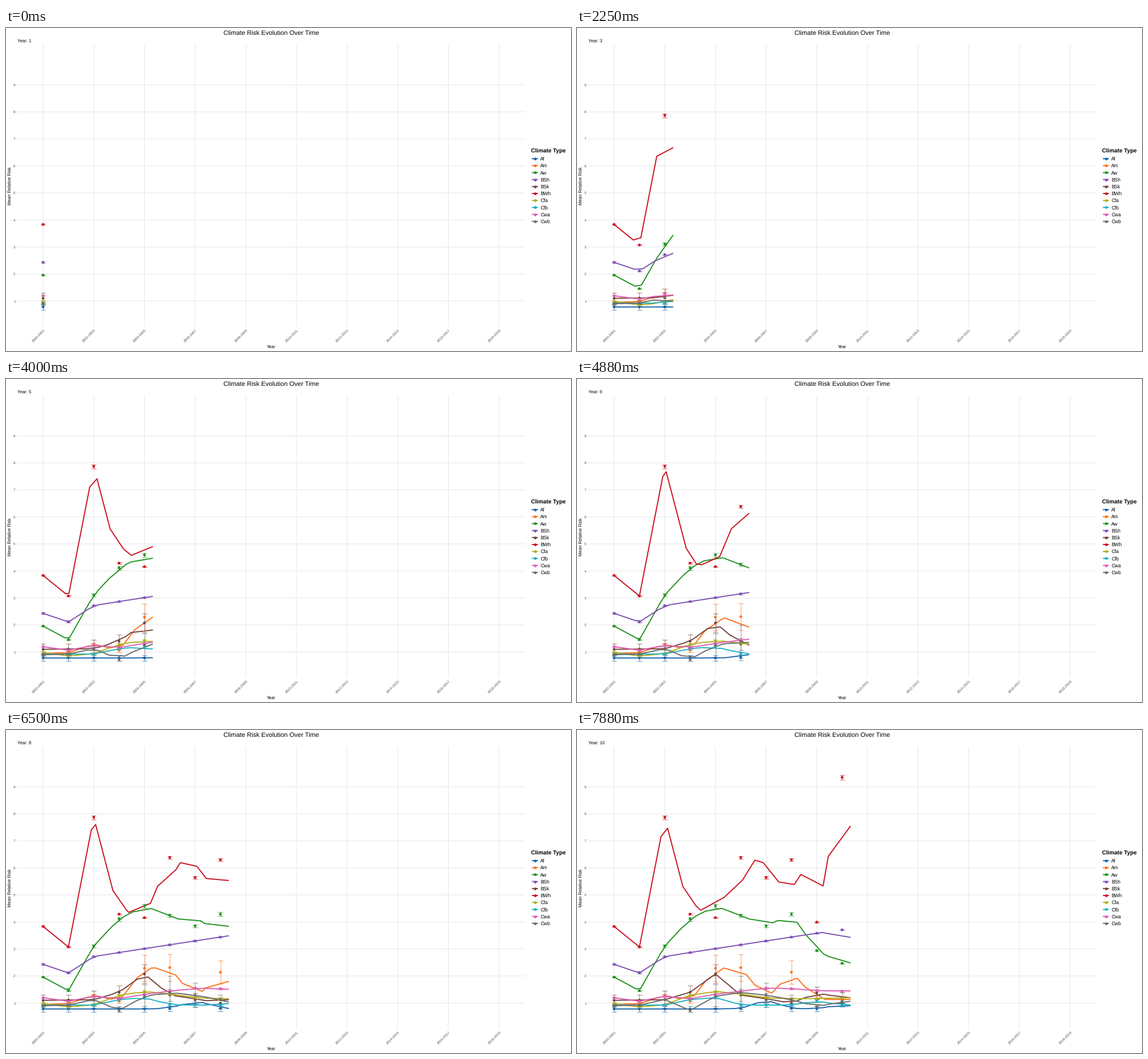
A matplotlib script that plays this animation: 990x566 px, repeating every 8 s.

```python
import matplotlib.pyplot as plt
import numpy as np
from matplotlib.animation import FuncAnimation
from matplotlib.collections import LineCollection
from matplotlib.colors import to_rgba

W, H, DPI = 990, 566, 64
PT = 72 / DPI  # points per pixel
FRAMES, INTERVAL = 64, 125
PATH_POINTS = 50

# First frame and number of steps of the move to each next year
STARTS = np.cumsum([4] + [7] * 6 + [6, 6, 5])
STEPS = [3, 2] + [3] * 8


class Climate:
    """A straight trend with bell-shaped bumps (year, height, width)."""

    def __init__(self, color, start, slope, bumps, error=.03, error_growth=0):
        years = np.arange(1, len(STARTS) + 2)
        swing = sum(height * np.exp(-((years - centre) / width) ** 2)
                    for centre, height, width in bumps)
        self.color = color
        self.risk = start + slope * (years - 1) + swing
        self.error = error + error_growth * np.maximum(swing, 0)


CLIMATES = {
    "Af": Climate("#1764ab", .78, 0, [(7, .33, .6), (10, .18, .5)], .1),
    "Am": Climate("#fd6f1c", .95, .02, [(3, .3, .5), (5.5, 1.86, .8), (8, 1.05, .5)],
                  .07, .34),
    "Aw": Climate("#20921f", 1.9, .06, [(2, -.95, .6), (5, 2.45, 2.3), (8, 1.52, .9)],
                  .02, .025),
    "BSh": Climate("#7f4fb3", 2.44, .143, [(2, -.47, .5), (11, -1, .5)], .025),
    "BSk": Climate("#73423a", 1.1, .01, [(4.9, .95, .8), (8, -.18, .5), (9, .2, .5)],
                   .2, .15),
    "BWh": Climate("#cb1020", 3.85, 0,
                   [(2, -.92, .5), (3.1, 4.15, .6), (6.35, 2.95, .9),
                    (8, 2.35, .5), (10, 5.5, .5)], .02, .013),
    "Cfa": Climate("#b0b016", .99, .022, [(2.5, -.25, .8), (5, .35, 1.6)]),
    "Cfb": Climate("#1cb2c5", .92, 0, [(4.6, .36, .8), (9, .15, .6)], .05),
    "Cwa": Climate("#dd5cb4", 1.2, .026, [(2, -.16, .5), (4, -.12, .5), (7.2, .2, 1.5)]),
    "Cwb": Climate("#696969", .9, .018,
                   [(3, .18, .5), (4, -.33, .5), (6, .4, 1.7), (9, -.2, .5)], .05, 1.4),
}


def px(year):
    return 65 + 44.39 * (np.asarray(year) - 1)


def py(value):
    return 478.4 - 47.35 * (np.asarray(value) - 1)


def dense_path(values):
    """Split the segments, by their length, until the path has PATH_POINTS."""
    years = np.arange(1, len(values) + 1)
    lengths = np.hypot(1, np.diff(values))
    rest, spare, xs = lengths.sum(), PATH_POINTS - len(values), []
    for year, length in zip(years, lengths):
        extra = round(spare * length / rest)
        xs.extend(np.linspace(year, year + 1, extra + 2)[:-1])
        rest, spare = rest - length, spare - extra
    xs.extend([years[-1]] * (PATH_POINTS - len(xs)))
    return np.array([xs, np.interp(xs, years, values)])


def morph(values, year, t):
    return (1 - t) * dense_path(values[:year]) + t * dense_path(values[:year + 1])


plt.rcParams["font.family"] = "Liberation Sans"
plt.rcParams["text.hinting"] = "none"
fig = plt.figure(figsize=(W / DPI, H / DPI), dpi=DPI, facecolor="white")
ax = fig.add_axes([0, 0, 1, 1])
ax.set(xlim=(0, W), ylim=(H, 0))
ax.axis("off")


def text(x, y, s, size, **style):
    return ax.text(x, y, s, fontsize=size * PT, **style)


def stroke(xs, ys, color, width, **style):
    return ax.plot(xs, ys, color=color, lw=width * PT, solid_capstyle="butt",
                   solid_joinstyle="round", snap=False, **style)[0]


def dots(xs, ys, colors, **style):
    return ax.scatter(xs, ys, s=(4.7 * PT) ** 2, c=colors, linewidths=0, **style)


GRID, TICK = "#e9e9e9", "#4d4d4d"
for value in range(1, 10):
    stroke([20, 909], [py(value)] * 2, GRID, 1.1, zorder=0)
    text(16.5, py(value) + 2.2, value, 6.2, color=TICK, ha="right")
for year in range(1, 20, 2):
    stroke([px(year)] * 2, [29, 523], GRID, 1.1, zorder=0)
    text(px(year) + 4.3, 527, f"{1999 + year}-{2000 + year}", 6.2, color=TICK,
         rotation=45, ha="right", va="top")

text(464.5, 12.8, "Climate Risk Evolution Over Time", 11.3, ha="center")
text(464.5, 561.3, "Year", 7.8, ha="center")
text(6.7, 277, "Mean Relative Risk", 7.8, rotation=90, ha="center", va="center")
label = text(20, 24.6, "", 7.8)

text(920.5, 218, "Climate Type", 9.9, weight="bold")
for i, (name, climate) in enumerate(CLIMATES.items()):
    y = 229 + 12.2 * i
    stroke([921.5, 932], [y, y], climate.color, 1.9)
    dots([926.7], [y], [climate.color], zorder=3)
    text(936.3, y + 3.2, name, 8.5)

lines = [(c, stroke([], [], c.color, 1.9, zorder=2)) for c in CLIMATES.values()]


def year_marks(i):
    """Error bars and points of all climates in one year."""
    x, segments, shades = px(i + 1), [], []
    for c in CLIMATES.values():
        low, high = py(c.risk[i] - c.error[i]), py(c.risk[i] + c.error[i])
        segments += [[(x, low), (x, high)]]
        segments += [[(x - 4.4, y), (x + 4.4, y)] for y in (low, high)]
        shades += [to_rgba(c.color, .65)] * 3
    bars = LineCollection(segments, colors=shades, linewidths=PT, zorder=3)
    ax.add_collection(bars)
    points = dots([x] * len(CLIMATES), [py(c.risk[i]) for c in CLIMATES.values()],
                  [c.color for c in CLIMATES.values()], zorder=4)
    return bars, points


marks = [year_marks(i) for i in range(len(STARTS))]


def pose(frame):
    """Year that is left, progress to the next one, and the year in the label."""
    year, t, shown = 1, 0, 1
    for i, (start, steps) in enumerate(zip(STARTS, STEPS)):
        if frame >= start:
            year, t = i + 1, min(1, (frame - start + 1) / steps)
            shown = year + int(frame >= start + steps)
    return year, t, shown


def update(frame):
    year, t, shown = pose(frame)
    label.set_text(f"Year: {shown}")
    for climate, line in lines:
        x, y = morph(climate.risk, year, t)
        line.set_data(px(x), py(y))
    reached = year + (t == 1)
    for i, pair in enumerate(marks):
        for artist in pair:
            artist.set_visible(i < reached)
    return [label, *(line for _, line in lines)]


anim = FuncAnimation(fig, update, frames=FRAMES, interval=INTERVAL,
                     init_func=lambda: update(0), repeat=True, repeat_delay=0)
plt.show()
```
